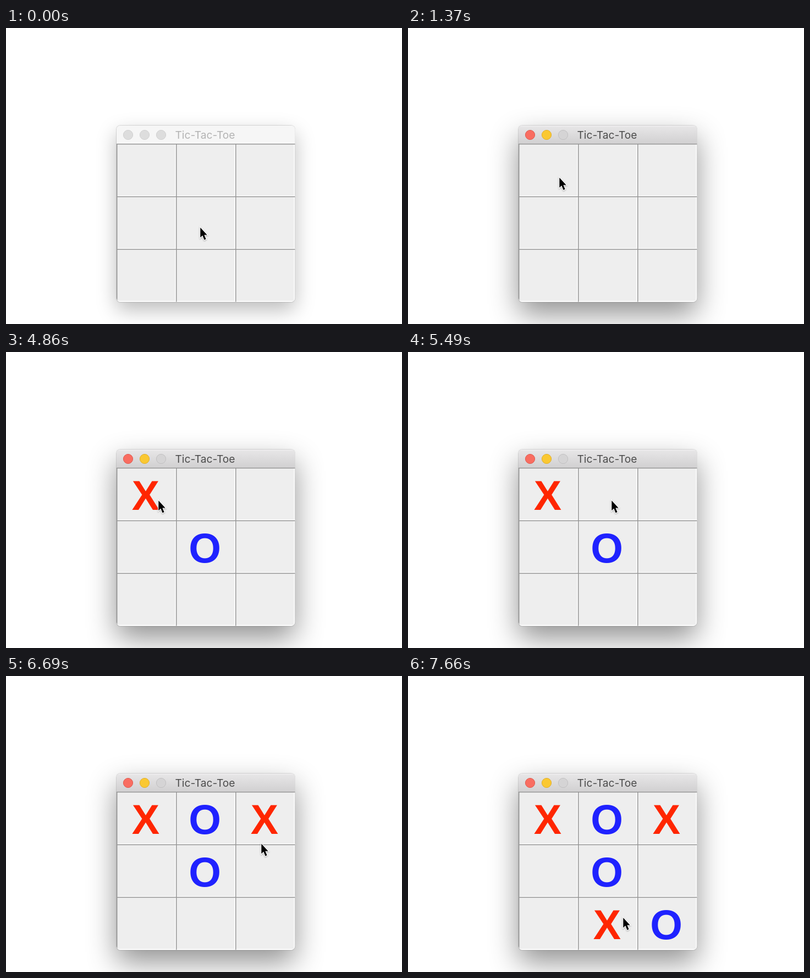
Recreate the animation shown at these times as an HTML page. Size 720 px wide and 540 px high, loop 8000 ms.

```html
<!DOCTYPE html>
<html lang="en">
<head>
<meta charset="utf-8">
<title>Tic-Tac-Toe</title>
<style>
  html, body { margin: 0; width: 100%; height: 100%; overflow: hidden; background: #fff; }
  .shadow {
    position: absolute; left: 201px; top: 178px; width: 324px; height: 321.5px;
    border-radius: 7px;
  }
  .idle { box-shadow: 0 0 0 1px rgba(0,0,0,.13), 0 14px 36px rgba(0,0,0,.27); }
  .focus { box-shadow: 0 0 0 1px rgba(0,0,0,.13), 0 22px 52px rgba(0,0,0,.43); }
  svg { position: absolute; left: 0; top: 0; }

  .title { font: 19.2px Inter, "Liberation Sans", sans-serif; text-anchor: middle; }
  .mark { font: bold 75.5px "Liberation Sans", Arial, sans-serif; text-anchor: middle; }
  .x { fill: #ff2600; }
  .o { fill: #1f22ff; }

  /* One shared 8 s clock; every change is a hard step */
  .anim { animation: 8s step-end infinite; }
  .idle { animation-name: idle; }
  .focus { animation-name: focus; }
  .m1 { animation-name: m1; }
  .m2 { animation-name: m2; }
  .m3 { animation-name: m3; }
  .m4 { animation-name: m4; }
  .m5 { animation-name: m5; }
  .m6 { animation-name: m6; }
  .pointer { animation-name: pointer; }

  @keyframes idle { 0% { visibility: visible } 17.125%, 100% { visibility: hidden } }
  @keyframes focus { 0% { visibility: hidden } 17.125%, 100% { visibility: visible } }
  @keyframes m1 { 0% { visibility: hidden } 17.875%, 100% { visibility: visible } }
  @keyframes m2 { 0% { visibility: hidden } 60.75%, 100% { visibility: visible } }
  @keyframes m3 { 0% { visibility: hidden } 74.25%, 100% { visibility: visible } }
  @keyframes m4 { 0% { visibility: hidden } 76.5%, 100% { visibility: visible } }
  @keyframes m5 { 0% { visibility: hidden } 94.25%, 100% { visibility: visible } }
  @keyframes m6 { 0% { visibility: hidden } 95.75%, 100% { visibility: visible } }

  @keyframes pointer {
    0% { transform: translate(353px, 363px) }
    /* to the top left cell */
    8.625% { transform: translate(348px, 358px) }
    9.325% { transform: translate(331px, 338px) }
    10.025% { transform: translate(310px, 313px) }
    10.725% { transform: translate(291px, 290px) }
    11.425% { transform: translate(279px, 277px) }
    12.125% { transform: translate(275px, 272px) }
    22.125% { transform: translate(276px, 271px) }
    22.875% { transform: translate(277px, 270px) }
    /* to the top right cell */
    66.5% { transform: translate(284px, 270px) }
    67.333% { transform: translate(318px, 270px) }
    68.167% { transform: translate(370px, 270px) }
    69% { transform: translate(425px, 270px) }
    69.833% { transform: translate(466px, 271px) }
    70.667% { transform: translate(484px, 271px) }
    71.5% { transform: translate(482px, 271px) }
    /* to the bottom middle cell */
    82.125% { transform: translate(480px, 274px) }
    82.847% { transform: translate(475px, 285px) }
    83.569% { transform: translate(464px, 305px) }
    84.292% { transform: translate(449px, 332px) }
    85.014% { transform: translate(434px, 361px) }
    85.736% { transform: translate(418px, 389px) }
    86.458% { transform: translate(406px, 411px) }
    87.181% { transform: translate(397px, 428px) }
    87.903% { transform: translate(393px, 437px) }
    88.625%, 100% { transform: translate(391px, 440px) }
  }
  .arrow { filter: drop-shadow(0 1.5px 1px rgba(0,0,0,.3)); }
</style>
</head>
<body>
<div class="shadow idle anim"></div>
<div class="shadow focus anim"></div>
<svg width="720" height="540" viewBox="0 0 720 540">
  <defs>
    <linearGradient id="bar" x1="0" y1="0" x2="0" y2="1">
      <stop offset="0" stop-color="#e8e7e8"/>
      <stop offset="1" stop-color="#d1d0d1"/>
    </linearGradient>
    <clipPath id="frame"><rect x="201" y="178" width="324.5" height="321.5" rx="7"/></clipPath>
  </defs>

  <g clip-path="url(#frame)">
    <rect x="200" y="178" width="326" height="322" fill="#eee"/>
    <g class="idle anim" style="box-shadow:none">
      <rect x="200" y="178" width="326" height="33" fill="#f6f6f6"/>
      <g fill="#dddddd" stroke="#d0d0d0">
        <circle cx="222" cy="195" r="8.6"/>
        <circle cx="252" cy="195" r="8.6"/>
        <circle cx="282" cy="195" r="8.6"/>
      </g>
      <text class="title" x="362" y="202.3" fill="#b3b3b3">Tic-Tac-Toe</text>
    </g>
    <g class="focus anim" style="box-shadow:none">
      <rect x="200" y="178" width="326" height="33" fill="url(#bar)"/>
      <path d="M200 178.7h326" stroke="#f3f2f3"/>
      <circle cx="222" cy="195" r="8.6" fill="#f96d61" stroke="#df5b50"/>
      <circle cx="252" cy="195" r="8.6" fill="#fac832" stroke="#dfae2c"/>
      <circle cx="282" cy="195" r="8.6" fill="#d5d4d5" stroke="#c1c0c1"/>
      <text class="title" x="362" y="202.3" fill="#4b4b4b">Tic-Tac-Toe</text>
    </g>
    <g fill="none" stroke-width="1.5">
      <path stroke="#fcfcfc" d="M308.25 212v288m108-288v288m108-288v288M202 306.5h324m-324 96h324m-324 96h324"/>
      <path stroke="#979797" d="M201.75 211v289m108-289v289m108-289v289M201 211.75h325m-325 96h325m-325 96h325"/>
    </g>
  </g>

  <g class="mark">
    <text class="x m1 anim" x="254" y="288">X</text>
    <text class="o m2 anim" x="361.7" y="384">O</text>
    <text class="x m3 anim" x="470" y="288">X</text>
    <text class="o m4 anim" x="361.7" y="288">O</text>
    <text class="x m5 anim" x="362" y="480">X</text>
    <text class="o m6 anim" x="469.7" y="480">O</text>
  </g>

  <g class="pointer anim">
    <path class="arrow" d="M.3 1V19.3L4.3 15.6L7.5 23.4L10.6 22.1L7.4 14.4H12.7Z"
      stroke="#fff" stroke-width="2.4" paint-order="stroke"/>
  </g>
</svg>
</body>
</html>
```
